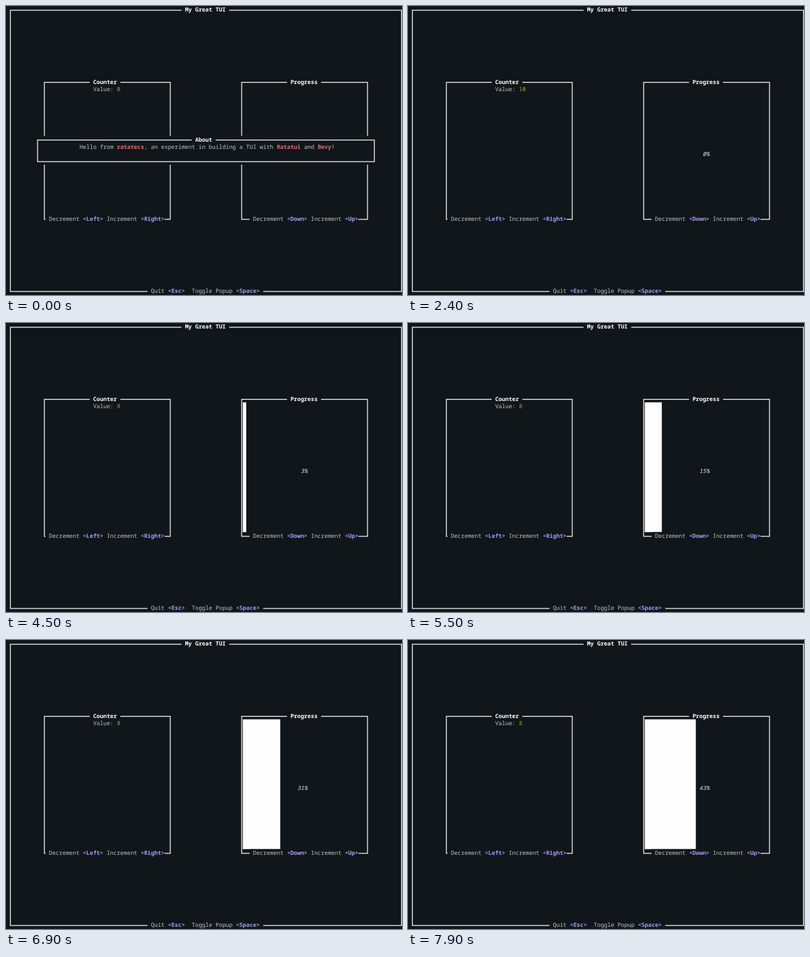
These frames come from a looping animation (720 by 526 pixels, 8000 ms). An HTML page with a canvas:

```html
<!DOCTYPE html>
<html lang="en">
<head>
<meta charset="utf-8">
<title>My Great TUI</title>
<style>
html, body { margin: 0; width: 100%; height: 100%; overflow: hidden; background: #11161a; }
canvas { display: block; width: 720px; height: 526px; }
</style>
</head>
<body>
<canvas id="stage" width="720" height="526"></canvas>
<script>
const ctx = document.getElementById('stage').getContext('2d');
const LOOP = 8000;
const CW = 6.185, CH = 13.125, X0 = 3.8, Y0 = 0;
const RULE_X = 4.1, RULE_Y = 7.7; // line position inside a cell
const BG = '#11161a', LINE = '#d6d6d6', TEXT = '#c4c6c7', WHITE = '#fdfdfd';
const BLUE = '#9d9ff5', RED = '#e2706b', OLIVE = '#a5a53a';
const FONT = '10.31px "Noto Sans Mono", "DejaVu Sans Mono", monospace';
const REPEAT_DELAY = 500, REPEAT_STEP = 1000 / 12;

const cellX = col => X0 + col * CW;
const cellY = row => Y0 + row * CH;

function fillCells(col, row, w, h, color) {
  ctx.fillStyle = color;
  ctx.fillRect(cellX(col), cellY(row), w * CW, h * CH);
}

function box(c0, r0, c1, r1) {
  ctx.strokeStyle = LINE;
  ctx.lineWidth = 1.8;
  ctx.strokeRect(cellX(c0) + RULE_X, cellY(r0) + RULE_Y, (c1 - c0) * CW, (r1 - r0) * CH);
}

// Writes [text, color, style] spans from a cell onward, covering what is below.
function write(col, row, ...spans) {
  for (const [text, color = TEXT, style = ''] of spans) {
    fillCells(col, row, text.length, 1, BG);
    ctx.font = style + ' ' + FONT;
    ctx.fillStyle = color;
    ctx.fillText(text, cellX(col), cellY(row) + 10.3);
    col += text.length;
  }
}

const bold = (text, color = WHITE) => [text, color, 'bold'];
const key = name => bold(`<${name}>`, BLUE);

// Key events from a held key: one at once, then repeats after a delay.
function presses(t, start, max) {
  if (t < start) return 0;
  const held = t - start - REPEAT_DELAY;
  return Math.min(max, held < 0 ? 1 : 2 + Math.floor(held / REPEAT_STEP));
}

function drawCounter(value) {
  box(10, 10, 47, 29);
  write(24, 10, bold(' Counter '));
  write(25, 11, ['Value: '], [String(value), OLIVE]);
  write(11, 29, [' Decrement '], key('Left'), [' Increment '], key('Right'));
}

function drawProgress(percent) {
  box(68, 10, 105, 29);
  write(82, 10, bold(' Progress '));
  fillCells(69, 11, Math.round(36 * percent / 100), 18, WHITE);
  const label = percent + '%';
  write(69 + Math.floor((36 - label.length) / 2), 20, [label, '#f0f0f0', 'italic']);
  write(71, 29, [' Decrement '], key('Down'), [' Increment '], key('Up'));
}

function drawPopup() {
  fillCells(8, 18, 100, 4, BG);
  box(8, 18, 107, 21);
  write(54, 18, bold(' About '));
  write(21, 19, ['Hello from '], bold('ratatecs', RED),
    [', an experiment in building a TUI with '], bold('Ratatui', RED),
    [' and '], bold('Bevy', RED), ['!']);
}

function draw(t) {
  ctx.fillStyle = BG;
  ctx.fillRect(0, 0, 720, 526);
  box(0, 0, 115, 39);
  write(51, 0, bold(' My Great TUI '));
  write(41, 39, [' Quit '], key('Esc'), ['  Toggle Popup '], key('Space'), [' ']);
  drawCounter(presses(t, 1200, 13) - presses(t, 2900, 5));
  drawProgress(presses(t, 3915, 100));
  if (t < 800) drawPopup();
}

ctx.textRendering = 'geometricPrecision';
const begin = performance.now();
function tick() {
  draw((performance.now() - begin) % LOOP);
  requestAnimationFrame(tick);
}
tick();
</script>
</body>
</html>
```
